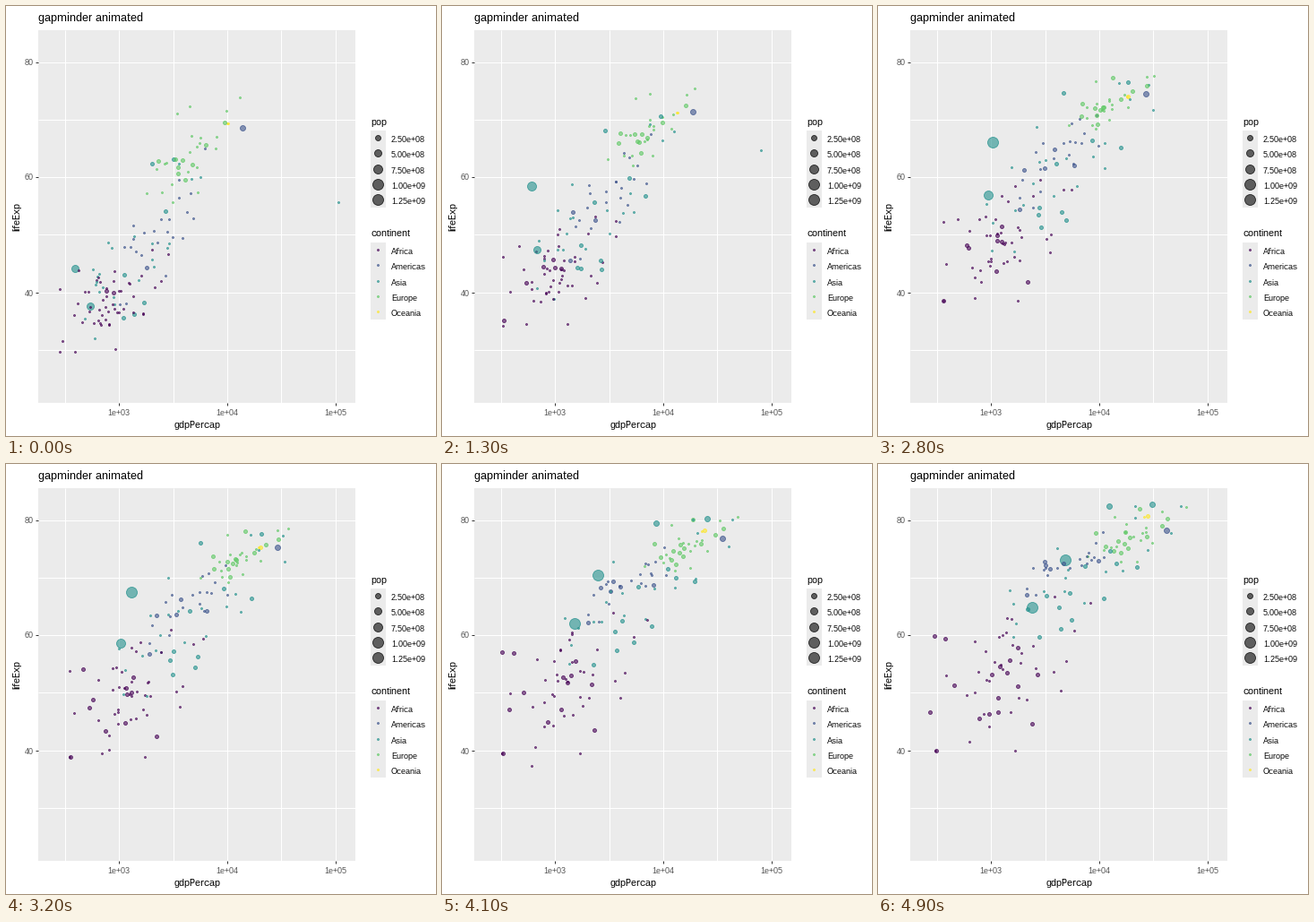
A matplotlib script that plays this animation: 480x480 px, repeating every 5000 ms.

```python
import numpy as np
import matplotlib.pyplot as plt
from matplotlib.animation import FuncAnimation
from matplotlib.colors import to_rgba
from matplotlib.patches import Rectangle

plt.rcParams.update({
    "font.family": "Liberation Sans",
    "text.hinting": "native",
    "text.hinting_factor": 1,
})

FRAMES = 50
LAST = FRAMES - 1
MAX_POP = 1319              # millions
COLORS = {"Africa": "#440154", "Americas": "#3B528B", "Asia": "#21908C",
          "Europe": "#5DC863", "Oceania": "#FDE725"}

# Each continent's cloud at the start, middle and end of the loop
CLOUDS = {
    "Africa": dict(count=50, gdp=(2.97, 3.15, 3.2), gdp_spread=(0.27, 0.3, 0.38),
                   life=(39, 49.5, 55), life_spread=(5, 6, 8), pop=3, growth=3.7),
    "Americas": dict(count=24, gdp=(3.47, 3.7, 3.85), gdp_spread=(0.24, 0.23, 0.27),
                     life=(53, 64.5, 73.5), life_spread=(8, 6.5, 3.5), pop=3, growth=2.7),
    "Asia": dict(count=29, gdp=(3.15, 3.6, 3.85), gdp_spread=(0.32, 0.43, 0.48),
                 life=(47, 60, 71), life_spread=(8, 8, 6), pop=7, growth=2.8),
    "Europe": dict(count=30, gdp=(3.7, 4.08, 4.36), gdp_spread=(0.23, 0.2, 0.24),
                   life=(65, 72, 77.5), life_spread=(5, 2.5, 2.5), pop=8, growth=1.35),
    "Oceania": dict(count=2, gdp=(4.01, 4.24, 4.46), gdp_spread=(0.02, 0.03, 0.07),
                    life=(69.3, 72.8, 80.7), life_spread=(0.2, 0.7, 0.5), pop=5, growth=2.2),
}

rng = np.random.default_rng(7)
frame_axis = np.arange(FRAMES)
countries = []


def add_country(continent, times, log_gdp, life, pop_start, pop_end):
    countries.append((np.interp(frame_axis, times, log_gdp),
                      np.interp(frame_axis, times, life),
                      np.linspace(pop_start, pop_end, FRAMES), continent))


def add_landmark(continent, pops, *points):
    """Points are (frame, gdp, life expectancy)."""
    times, gdp, life = np.transpose(points)
    add_country(continent, times, np.log10(gdp), life, *pops)


def add_cloud(continent, count, gdp, gdp_spread, life, life_spread, pop, growth):
    for _ in range(count):
        wealth = 0.95 * rng.normal() + 0.25 * rng.normal(size=3)
        health = 0.6 * wealth + 0.75 * rng.normal() + 0.25 * rng.normal(size=3)
        wealth, health = np.clip([wealth, health], -1.9, 1.9)
        size = min(pop * np.exp(1.1 * rng.normal()), 80)
        add_country(continent, (0, LAST / 2, LAST), gdp + wealth * gdp_spread,
                    life + health * life_spread, size, size * growth)


for continent, cloud_rule in CLOUDS.items():
    add_cloud(continent, **cloud_rule)

# The outliers and giants that stand clear of the clouds
add_landmark("Asia", (556, 1319), (0, 400, 44), (9, 488, 44.5), (13, 613, 58.4),
             (22, 741, 64), (36, 1656, 68.7), (49, 4959, 73))
add_landmark("Asia", (372, 1110), (0, 547, 37.4), (22, 813, 54.2),
             (36, 1164, 60.2), (49, 2452, 64.7))
add_landmark("Asia", (86, 127), (0, 3217, 63), (18, 14779, 73.4), (49, 31656, 82.6))
add_landmark("Asia", (0.2, 2.5), (0, 108382, 55.6), (13, 80895, 64.6),
             (18, 109348, 67.7), (27, 31354, 71.3), (49, 47307, 77.6))
add_landmark("Americas", (158, 301), (0, 13990, 68.4), (22, 24073, 73.4),
             (49, 42952, 78.2))
add_landmark("Africa", (2.5, 9), (0, 493, 40), (31, 848, 44), (36, 737, 23.6),
             (40, 590, 36), (49, 863, 46.2))
add_landmark("Africa", (14, 65), (0, 781, 39.1), (22, 796, 47.8), (49, 278, 46.5))

order = rng.permutation(len(countries))
gdp, life, pop = (np.array([countries[i][k] for i in order]) for k in range(3))
colors = [COLORS[countries[i][3]] for i in order]


def x_pixel(log_gdp):
    return 125.8 + 120.7 * (np.asarray(log_gdp) - 3)


def y_pixel(years):
    return 62.6 + 6.41 * (80 - np.asarray(years))


def centre(value):
    return np.floor(value) + 0.5


def radius(size):
    return np.floor(0.375 * (size * 2.845 + 0.945))


def pop_radius(millions):
    return radius(1 + 5 * np.sqrt(np.clip(np.asarray(millions) / MAX_POP, 0, 1)))


fig = plt.figure(figsize=(480 / 72, 480 / 72), dpi=72, facecolor="white")
ax = fig.add_axes([0, 0, 1, 1])
ax.set(xlim=(0, 480), ylim=(480, 0))
ax.axis("off")


def box(x0, y0, x1, y1):
    ax.add_patch(Rectangle((x0, y0), x1 - x0, y1 - y0, fc="#EBEBEB", lw=0, zorder=0))


def line(x0, y0, x1, y1, color):
    ax.plot([x0, x1], [y0, y1], color=color, lw=1, solid_capstyle="butt", zorder=1)


def label(x, y, text, size, color="black", **kw):
    ax.text(x, y, text, size=size, color=color, **kw)


def dots(x, y, r, dot_colors):
    return ax.scatter(x, y, s=4 * np.square(r), linewidths=0.8, zorder=3,
                      facecolors=[to_rgba(c, 0.6) for c in dot_colors],
                      edgecolors=[to_rgba(c, 0.8) for c in dot_colors])


LEFT, TOP, RIGHT, BOTTOM = 36, 27, 390, 443
box(LEFT, TOP, RIGHT, BOTTOM)
for power in (2.5, 3, 3.5, 4, 4.5, 5):
    x = centre(x_pixel(power))
    line(x, TOP, x, BOTTOM, "white")
    if power == int(power):
        line(x, BOTTOM, x, BOTTOM + 3, "#333333")
        label(x, 457, f"1e+{power:02d}", 9, "#4D4D4D", ha="center")
for years in range(30, 81, 10):
    y = centre(y_pixel(years))
    line(LEFT, y, RIGHT, y, "white")
    if years % 20 == 0:
        line(LEFT - 3, y, LEFT, y, "#333333")
        label(31, y + 4, str(years), 9, "#4D4D4D", ha="right")

label(36, 17, "gapminder animated", 13)
label(213.5, 471, "gdpPercap", 11, ha="center")
label(12, 235, "lifeExp", 11, rotation=90, ha="center", va="center")

KEY = 17.28


def legend(title, title_y, first_y, names, radii, key_colors):
    label(407, title_y, title, 11)
    top = first_y - KEY / 2
    box(407, round(top), 424, round(top + 5 * KEY))
    ys = centre(first_y + KEY * np.arange(5))
    dots([415.5] * 5, ys, radii, key_colors)
    for y, name in zip(ys, names):
        label(430, y + 4.5, name, 9)


pops = [250, 500, 750, 1000, 1250]
legend("pop", 133, 147.5, [f"{p * 1e6:.2e}" for p in pops], pop_radius(pops),
       ["black"] * 5)
legend("continent", 257, 272.5, COLORS, [radius(1.5)] * 5, COLORS.values())

cloud = dots(gdp[:, 0], life[:, 0], pop_radius(pop[:, 0]), colors)


def update(frame):
    cloud.set_offsets(np.column_stack([centre(x_pixel(gdp[:, frame])),
                                       centre(y_pixel(life[:, frame]))]))
    cloud.set_sizes(4 * pop_radius(pop[:, frame]) ** 2)
    return (cloud,)


anim = FuncAnimation(fig, update, frames=FRAMES, interval=100, repeat=True)
plt.show()
```
